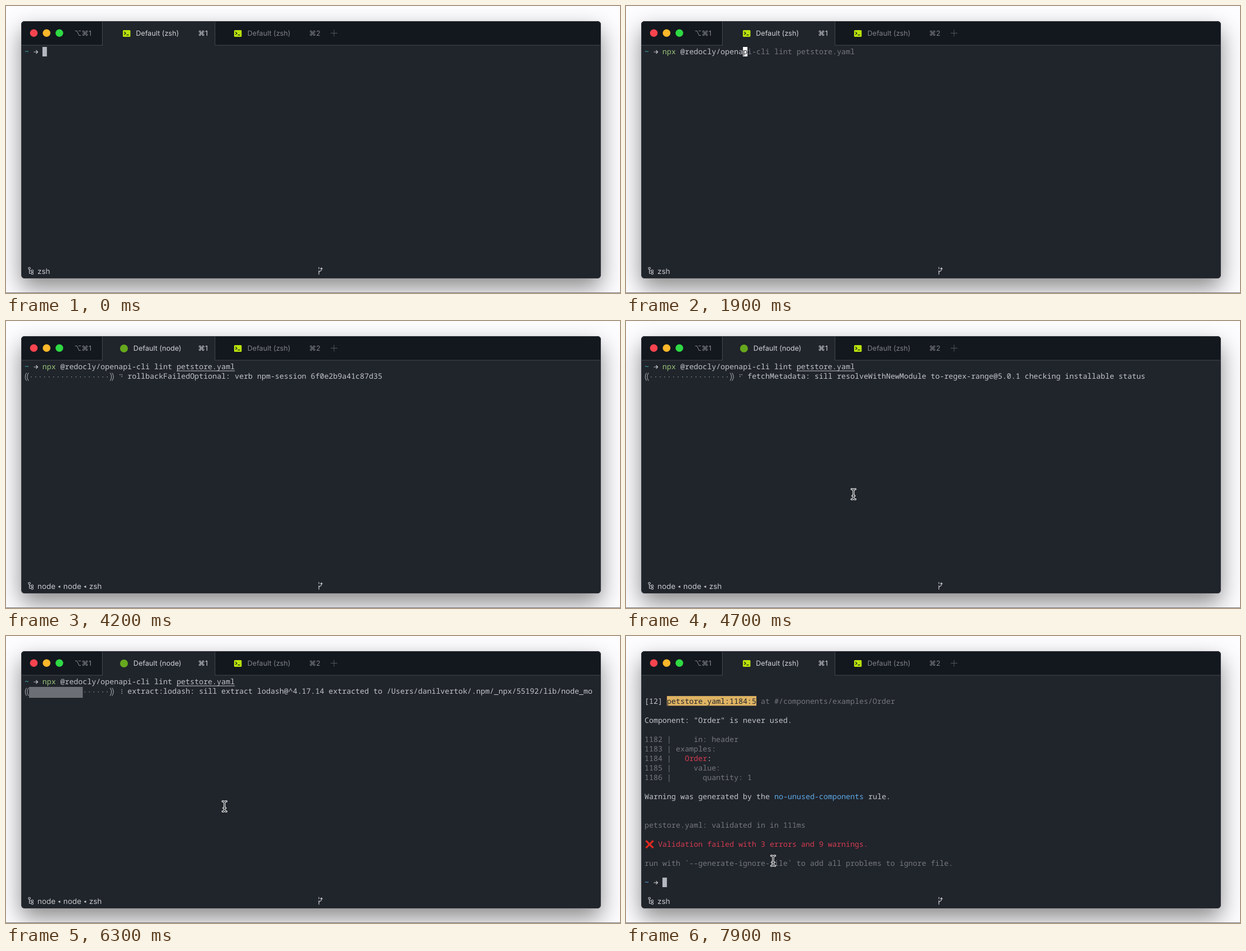
An HTML page with a canvas for the animation above (8000 ms loop, 1093x512 px).

```html
<!DOCTYPE html>
<html lang="en">
<head>
<meta charset="utf-8">
<title>Terminal lint run</title>
<style>
  html, body { margin: 0; width: 100%; height: 100%; overflow: hidden; background: #fdfcfe; }
  canvas { display: block; width: 1093px; height: 512px; }
</style>
</head>
<body>
<canvas id="stage"></canvas>
<script>
const W = 1093, H = 512, LOOP = 8000, STEP = 100;
const canvas = document.getElementById('stage');
const ctx = canvas.getContext('2d');
const ratio = window.devicePixelRatio || 1;
canvas.width = W * ratio;
canvas.height = H * ratio;

const CELL = 7.965, ROW = 17.05, LEFT = 33, TOP = 73, COLUMNS = 127;
const MONO = '13.275px "Noto Sans Mono", "DejaVu Sans Mono", monospace';
const ui = size => `${size}px Inter, "DejaVu Sans", sans-serif`;
const C = {
  bar: '#13171e', term: '#20242b', line: '#44484e', text: '#c3c6ca', dim: '#75787d',
  green: '#98c379', teal: '#3fb5b0', blue: '#5fabe8', red: '#d53b50', amber: '#dfb363',
  block: '#b4b7bf', lime: '#b9e20c', node: '#67a81f'
};

const COMMAND = 'npx @redocly/openapi-cli lint petstore.yaml';
const FILE_START = COMMAND.indexOf('petstore');
const HOME = '/Users/danilvertok/.npm/_npx/55192/lib/node_modules/.staging/';

// Key points: time, then one or more values.
const TYPED = [[0, 0], [100, 1], [200, 1], [400, 3], [500, 3], [600, 4], [700, 4],
  [1600, 13], [1900, 18], [2500, 25], [3000, 32], [3100, 32], [3400, 43]];
const FILLED = [[4700, 0], [4800, 1], [5500, 3], [5700, 7], [6100, 11], [6200, 11], [6300, 12], [6700, 18]];
const SPIN = [[4100, -11], [4700, 0], [5500, 15], [6100, 21], [6200, 21], [6300, 23], [6700, 27]];
const POINTER = [[4300, 432, 338], [4700, 405, 309], [4800, 389, 304], [7100, 389, 304], [7800, 268, 396], [7900, 262, 401]];

const FETCHED = ['@redocly/openapi-cli@1.0.0-beta.14', 'yargs@15.3.1', 'chokidar@3.4.0', 'to-regex-range@5.0.1',
  'js-yaml@3.13.1', 'string-width@4.2.0', 'readdirp@3.4.0', 'is-binary-path@2.1.0', 'decamelize@1.2.0',
  'node-fetch@2.6.0', 'minimatch@3.0.4', 'regenerator-runtime@0.13.5'];
const EXTRACTED = ['core-js@^3.6.4', 'yargs@^15.3.1', 'chokidar@^3.4.0', 'ajv@^6.12.0', 'esprima@^4.0.0',
  'js-yaml@^3.13.1', 'lodash@^4.17.14', 'colorette@^1.2.0', 'assert@^2.0.0', 'portfinder@^1.0.26', 'minimist@^1.2.5'];

// Braille spinner: bit n is dot n+1, three rows by two columns.
const SPINNER = [0x0b, 0x19, 0x39, 0x38, 0x3c, 0x34, 0x26, 0x27, 0x07, 0x0f];

function at(points, t, k = 1) {
  let a = points[0];
  for (const b of points) {
    if (t < b[0]) return t <= a[0] ? a[k] : a[k] + (b[k] - a[k]) * (t - a[0]) / (b[0] - a[0]);
    a = b;
  }
  return a[k];
}

const colX = col => LEFT + col * CELL;
const rowY = row => TOP + row * ROW;

function rect(x, y, w, h, color) {
  ctx.fillStyle = color;
  ctx.fillRect(x, y, w, h);
}

function label(str, x, y, color, font, align = 'left') {
  ctx.font = font;
  ctx.fillStyle = color;
  ctx.textAlign = align;
  ctx.fillText(str, x, y);
}

function disc(x, y, r, color) {
  ctx.fillStyle = color;
  ctx.beginPath();
  ctx.arc(x, y, r, 0, 7);
  ctx.fill();
}

function stroke(d, color, width, x = 0, y = 0) {
  ctx.save();
  ctx.translate(x, y);
  ctx.strokeStyle = color;
  ctx.lineWidth = width;
  ctx.stroke(new Path2D(d));
  ctx.restore();
}

const put = (str, col, row, color = C.text) => label(str, colX(col), rowY(row) + 13.4, color, MONO);
const block = (col, row, color = C.block) => rect(colX(col), rowY(row), CELL, 17, color);

function shellIcon(x) {
  ctx.fillStyle = C.lime;
  ctx.beginPath();
  ctx.roundRect(x, 43, 13.5, 12, 1.5);
  ctx.fill();
  stroke('M2.5 3.2L5 5.7L2.5 8.2M6.5 8.7H10.5', C.bar, 1.3, x, 43);
}

function drawWindow(running) {
  rect(0, 0, W, H, '#fdfcfe');
  ctx.save();
  ctx.shadowColor = 'rgba(0,0,0,.46)';
  ctx.shadowBlur = 40 * ratio;
  ctx.shadowOffsetY = 17 * ratio;
  ctx.fillStyle = C.term;
  ctx.beginPath();
  ctx.roundRect(27, 27, 1032, 459, 6);
  ctx.fill();
  ctx.restore();
  rect(0, 511, W, 1, '#77777a');

  ctx.save();
  ctx.clip();
  rect(27, 27, 1032, 43, C.bar);
  rect(172, 27, 200, 43, C.term);
  rect(27, 69.5, 145, 1, C.line);
  rect(372, 69.5, 687, 1, C.line);
  rect(171, 27, 1, 43, C.line);
  rect(371.5, 27, 1, 43, C.line);
  ctx.restore();
  ctx.strokeStyle = '#363a40';
  ctx.lineWidth = 1;
  ctx.beginPath();
  ctx.roundRect(27.5, 27.5, 1031, 458, 6);
  ctx.stroke();

  ['#f9444f', '#fdb72a', '#2fd944'].forEach((color, i) => disc(49.5 + i * 22.75, 48.2, 6.8, color));
  label('⌥⌘1', 137, 52.5, '#85888d', ui(12.5), 'center');
  if (running) disc(210, 49, 7, C.node); else shellIcon(208);
  label(`Default (${running ? 'node' : 'zsh'})`, 269.5, 53.3, '#d0d2d5', ui(12.6), 'center');
  label('⌘1', 350.5, 53.3, '#d0d2d5', ui(12.5), 'center');
  shellIcon(406);
  label('Default (zsh)', 468, 53.3, '#808388', ui(12.6), 'center');
  label('⌘2', 549.5, 53.3, '#808388', ui(12.5), 'center');
  stroke('M578 48.5H590M584 42.5V54.5', '#53575d', 1);
}

function drawStatus(running) {
  const color = '#c6c8cb';
  stroke('M2.6 4.5V11.5H6M2.6 7H6M4.4 2.6A1.8 1.8 0 1 1 .8 2.6A1.8 1.8 0 1 1 4.4 2.6' +
    'M9.6 7A1.8 1.8 0 1 1 6 7A1.8 1.8 0 1 1 9.6 7M9.6 11.5A1.8 1.8 0 1 1 6 11.5A1.8 1.8 0 1 1 9.6 11.5',
    color, 1.1, 39, 465.5);
  stroke('M1.5 0V3.5M1.5 6V13.5M1.5 9.5C1.5 7 6 8 6 5V1.5M4 3.5L6 1.3L8 3.5', color, 1.2, 555.5, 465.8);
  const names = running ? ['node', 'node', 'zsh'] : ['zsh'];
  names.forEach((name, i) => {
    const x = 56 + i * 46;
    label(name, x, 478.2, color, ui(13.4));
    if (i) {
      ctx.fillStyle = color;
      ctx.fill(new Path2D(`M${x - 9.5} 474L${x - 5.5} 471.7V476.3Z`));
    }
  });
}

function drawPrompt(row, color) {
  put('~', 0, row, color);
  stroke('M0 0H7M4 -3L7 0L4 3', C.text, 1.2, 49.5, rowY(row) + 9);
}

function drawCommand(t) {
  const count = Math.round(at(TYPED, t));
  drawPrompt(0, C.teal);
  put(COMMAND.slice(0, Math.min(count, 3)), 4, 0, t < 500 ? C.red : C.green);
  if (count > 3) put(COMMAND.slice(3, count), 7, 0);
  if (count > FILE_START) {
    rect(colX(4 + FILE_START), rowY(0) + 15.5, (count - FILE_START) * CELL, 1, C.text);
  }
  if (t >= 3700) return;
  const hint = t >= 200 && count < COMMAND.length;
  block(4 + count, 0, hint ? '#fff' : C.block);
  if (hint) {
    put(COMMAND[count], 4 + count, 0, C.term);
    put(COMMAND.slice(count + 1), 5 + count, 0, C.dim);
  }
}

function message(t) {
  if (t < 4400) return 'rollbackFailedOptional: verb npm-session 6f0e2b9a41c87d35';
  if (t < 5600) {
    return `fetchMetadata: sill resolveWithNewModule ${FETCHED[(t - 4400) / STEP]} checking installable status`;
  }
  // The log pauses for one step just before lodash.
  const i = t < 6200 ? (t - 5600) / STEP : (t - 5700) / STEP;
  const spec = EXTRACTED[i];
  return `extract:${spec.split('@')[0]}: sill extract ${spec} extracted to ${HOME}`;
}

function drawProgress(t) {
  const filled = Math.round(at(FILLED, t)), y = rowY(1);
  const brackets = 'M3 1C-.3 5 -.3 11 3 15M6.5 1C3.2 5 3.2 11 6.5 15';
  stroke(brackets, C.text, 1, colX(0) + .8, y + 1.5);
  ctx.save();
  ctx.translate(colX(20) - .6, y + 1.5);
  ctx.scale(-1, 1);
  stroke(brackets, C.text, 1);
  ctx.restore();

  const width = filled * CELL;
  rect(colX(1), y + 1, width, 19, '#4c5056');
  for (let k = 0; k < 19 && filled; k += 2) rect(colX(1), Math.round(y) + 1 + k, width, 1, '#8b8e93');
  for (let i = filled; i < 18; i++) rect(colX(i + 1) + 3.3, y + 9, 1.3, 1.3, '#a0a3a8');

  const turn = Math.round(at(SPIN, t));
  const dots = SPINNER[(turn % 10 + 10) % 10];
  for (let n = 0; n < 6; n++) {
    if (dots >> n & 1) rect(colX(21) + 2 + (n > 2 ? 3.3 : 0), y + 5 + n % 3 * 3.3, 1.4, 1.4, C.text);
  }
  put(message(t).slice(0, COLUMNS - 23), 23, 1);
}

function drawReport() {
  put('[12]', 0, 2);
  rect(colX(5), rowY(2), 20 * CELL, 17.3, C.amber);
  put('petstore.yaml:1184:5', 5, 2, '#20242b');
  put('at #/components/examples/Order', 26, 2, C.dim);
  put('Component: "Order" is never used.', 0, 4);
  ['    in: header', 'examples:', '', '    value:', '      quantity: 1'].forEach((code, i) =>
    put(`${1182 + i} | ${code}`, 0, 6 + i, C.dim));
  put('Order', 9, 8, C.red);
  put(':', 14, 8);
  put('Warning was generated by the', 0, 12);
  put('no-unused-components', 29, 12, C.blue);
  put('rule.', 50, 12);
  put('petstore.yaml: validated in in 111ms', 0, 15, C.dim);
  stroke('M0 0L13 13M13 0L0 13', '#e0281f', 3.4, 35.5, rowY(17) + 2.3);
  put('Validation failed with 3 errors and 9 warnings.', 3, 17, C.red);
  put('run with `--generate-ignore-file` to add all problems to ignore file.', 0, 19, C.dim);
}

function drawPointer(t) {
  const x = at(POINTER, t, 1), y = at(POINTER, t, 2);
  const beam = 'M-3.5 -9C-1 -9 0 -8 0 -6.5C0 -8 1 -9 3.5 -9M-3.5 9C-1 9 0 8 0 6.5C0 8 1 9 3.5 9M0 -7V7M-2 3H2';
  ctx.lineCap = 'round';
  stroke(beam, '#f4f4f5', 3.4, x, y);
  stroke(beam, '#15181d', 1.2, x, y);
  ctx.lineCap = 'butt';
}

function drawScene(t) {
  const running = t >= 4000 && t < 7200;
  ctx.setTransform(ratio, 0, 0, ratio, 0, 0);
  ctx.textRendering = 'geometricPrecision';
  drawWindow(running);
  drawStatus(running);
  if (t < 7000) {
    drawCommand(t);
    if (t >= 3700 && t < 4100) block(0, 1);
    else if (t >= 4100 && t < 6800) drawProgress(t);
    else if (t >= 6800) {
      put('npx: installed 106 in 3.108s', 0, 1);
      if (t >= 6900) put('validating petstore.yaml...', 0, 2, C.dim);
      block(0, t >= 6900 ? 3 : 2);
    }
  } else {
    drawReport();
    if (t >= 7200) drawPrompt(21, C.blue);
    block(t >= 7200 ? 4 : 0, 21);
  }
  if (t >= 4300) drawPointer(t);
}

const start = performance.now();
function tick() {
  const t = (performance.now() - start) % LOOP;
  drawScene(Math.floor(t / STEP) * STEP);
  requestAnimationFrame(tick);
}
tick();
</script>
</body>
</html>
```
